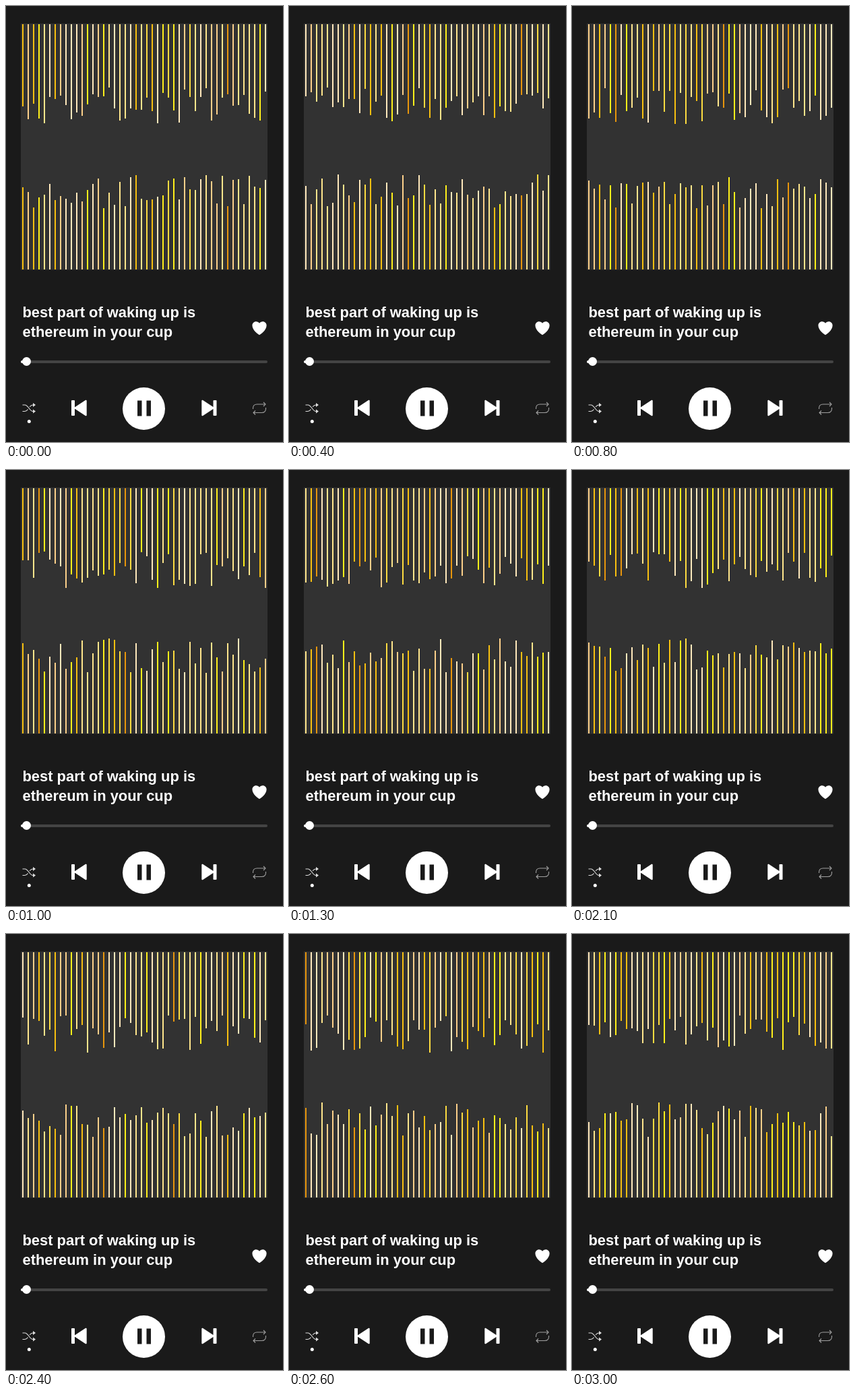
An HTML page that plays this animation: 411 by 647 pixels, repeating every 3100 ms.

```html
<!DOCTYPE html>
<html lang="en">
<head>
<meta charset="utf-8">
<title>Player</title>
<style>
  html, body { margin: 0; width: 100%; height: 100%; overflow: hidden; background: #1a1a1a; }
  svg { display: block; width: 411px; height: 647px; }
  text { font: bold 21.9px "Liberation Sans", Arial, sans-serif; fill: #fff; }
</style>
</head>
<body>
<svg viewBox="0 0 411 647">
  <rect width="411" height="647" fill="#1a1a1a"/>
  <rect x="22" y="26" width="366" height="365.5" fill="#323232"/>
  <g id="bars" shape-rendering="crispEdges"></g>

  <text x="24.5" y="462">best part of waking up is</text>
  <text x="24.5" y="491">ethereum in your cup</text>
  <path d="M376 488C375 488 365.400 481.500 365.400 474C365.400 470.700 368 468.200 371 468.200C373.200 468.200 375 469.300 376 470.800C377 469.300 378.800 468.200 381 468.200C384 468.200 386.600 470.700 386.600 474C386.600 481.500 377 488 376 488Z" fill="#fff"/>

  <rect x="22" y="526" width="366" height="4" rx="2" fill="#444"/>
  <rect x="22" y="526" width="9" height="4" rx="2" fill="#fff"/>
  <circle cx="30.5" cy="527.5" r="6.5" fill="#fff"/>

  <g fill="none" stroke="#ddd" stroke-width="1.2">
    <path d="M24.500 592H28C33 592 35 601.500 40 601.500H42M24.500 601.500H28C30 601.500 31.500 600 32.500 598.500M35 595C36.300 593.300 37.800 592 40 592H42"/>
    <path d="M40 589L44 592L40 595ZM40 598.500L44 601.500L40 604.500Z" fill="#ddd" stroke="none"/>
  </g>
  <circle cx="34.3" cy="616.5" r="2.5" fill="#fff"/>

  <g fill="#fff" stroke="#fff" stroke-width="2" stroke-linejoin="round">
    <path d="M98 586H101V607H98ZM118.700 585.700V607.300L102 596.500Z"/>
    <path d="M311.500 586H308.500V607H311.500ZM291.300 585.700V607.300L308 596.500Z"/>
  </g>
  <circle cx="204.5" cy="597.5" r="31.5" fill="#fff"/>
  <path d="M195 585.500H201.500V608.500H195ZM208.500 585.500H215V608.500H208.500Z" fill="#1a1a1a"/>

  <g fill="none" stroke="#a0a0a0" stroke-width="1.1">
    <path d="M366.500 598V597C366.500 593.200 369 591 372.500 591H385M385.500 596V597.500C385.500 601.300 383 603.500 379.500 603.500H367"/>
    <path d="M382 588L385 591L382 594M370 600.500L367 603.500L370 606.500"/>
  </g>
</svg>
<script>
const LOOP = 3100, STEP = 100, COUNT = 46;
const TOP = 27, BOTTOM = 391;
// Repeats weight the mix toward the pale tones.
const TONES = ["#ffe9bc", "#ffe9bc", "#ffe9bc", "#ffe68c", "#ffe68c", "#ffe68c",
  "#fcd08a", "#fcd08a", "#fddc40", "#fff01a", "#fff01a", "#f8c010", "#f8c010", "#e8960c"];

const group = document.getElementById("bars");
const addBar = x => {
  const bar = document.createElementNS("http://www.w3.org/2000/svg", "rect");
  bar.setAttribute("x", x);
  bar.setAttribute("width", 2);
  return group.appendChild(bar);
};
const pairs = Array.from({ length: COUNT }, (_, i) => [addBar(24 + i * 8), addBar(24 + i * 8)]);

function randomizer(seed) {
  return () => {
    seed = seed + 0x6D2B79F5 | 0;
    let n = Math.imul(seed ^ seed >>> 15, 1 | seed);
    n = n + Math.imul(n ^ n >>> 7, 61 | n) ^ n;
    return ((n ^ n >>> 14) >>> 0) / 4294967296;
  };
}

function setBar(bar, y, height, tone) {
  bar.setAttribute("y", y);
  bar.setAttribute("height", height);
  bar.setAttribute("fill", tone);
}

function drawBars(step) {
  const random = randomizer(step * 977 + 41);
  for (const [upper, lower] of pairs) {
    const tone = TONES[Math.floor(random() * TONES.length)];
    const down = 94 + Math.floor(random() * 56);
    const up = 90 + Math.floor(random() * 52);
    setBar(upper, TOP, down, tone);
    setBar(lower, BOTTOM - up, up, tone);
  }
}

let shown = -1;
const start = performance.now();
function tick(now) {
  const t = Math.max(0, now - start) % LOOP;
  // The opening pose holds for two steps.
  const step = Math.max(0, Math.floor(t / STEP) - 1);
  if (step !== shown) drawBars(shown = step);
  requestAnimationFrame(tick);
}
tick(start);
</script>
</body>
</html>
```
